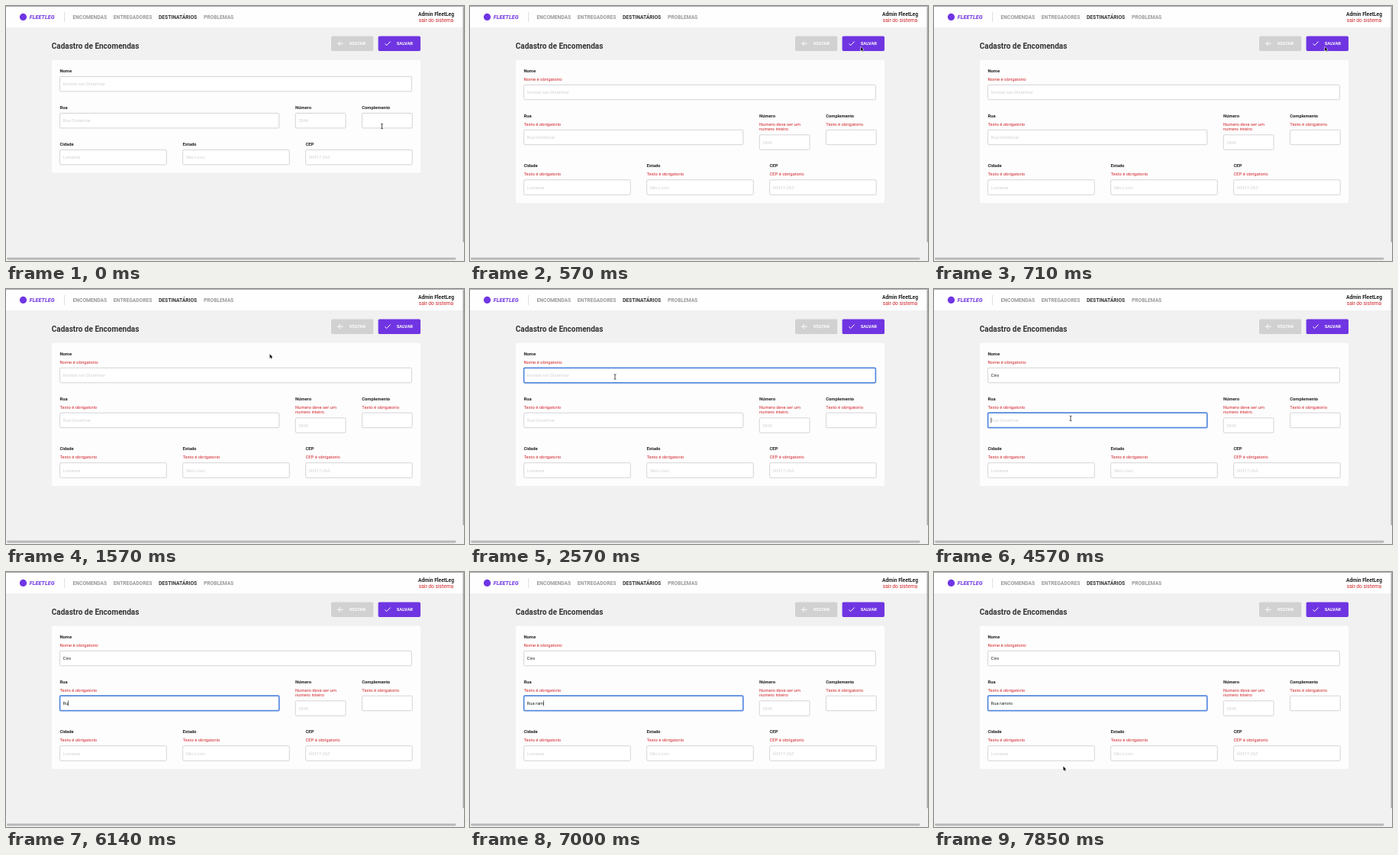
These frames come from a looping animation (600x334 px, 8000 ms). An HTML page with a canvas:

```html
<!DOCTYPE html>
<html lang="pt-BR">
<head>
<meta charset="utf-8">
<title>Cadastro de Encomendas</title>
<style>
html, body { margin: 0; width: 100%; height: 100%; overflow: hidden; background: #f1f1f1; }
canvas { display: block; width: 600px; height: 334px; }
</style>
</head>
<body>
<canvas id="stage"></canvas>
<script>
const W = 600, H = 334, LOOP = 8000, STEP = 1000 / 7;
const PURPLE = '#7035e2', RED = '#d2262b', DARK = '#222';
const ERRORS_AT = 560;

const canvas = document.getElementById('stage');
const ctx = canvas.getContext('2d');
const dpr = window.devicePixelRatio || 1;
canvas.width = W * dpr;
canvas.height = H * dpr;

const REQUIRED = ['Texto é obrigatorio'];
const fields = [
  { row: 0, x: 70.6, w: 460.8, label: 'Nome', hint: 'Konrad van Distelmar', errors: ['Nome é obrigatorio'],
    value: 'Ciro', focus: 2000, blur: 4430, keys: [2860, 3000, 3285, 3425] },
  { row: 1, x: 70.6, w: 287.2, label: 'Rua', hint: 'Rua Distelmar', errors: REQUIRED,
    value: 'Rua ramiro', focus: 4425, blur: LOOP,
    keys: [5710, 6000, 6425, 6565, 6710, 6855, 6995, 7140, 7140, 7285] },
  { row: 1, x: 379.2, w: 65.8, label: 'Número', hint: '2846', errors: ['Numero deve ser um', 'numero inteiro'] },
  { row: 1, x: 466.4, w: 65.8, label: 'Complemento', hint: '', errors: REQUIRED },
  { row: 2, x: 70.6, w: 139.6, label: 'Cidade', hint: 'Lumarea', errors: REQUIRED },
  { row: 2, x: 231.6, w: 139.6, label: 'Estado', hint: 'São Luvio', errors: REQUIRED },
  { row: 2, x: 392.6, w: 139.6, label: 'CEP', hint: '00417-263', errors: ['CEP é obrigatorio'] }
];
const ROWS = { clean: [84.6, 132.6, 180.6], invalid: [84.6, 143.5, 209] };
const FIELD_H = 19.5;

// Pointer path: time, x, y
const path = [
  [0, 492.5, 157.5], [140, 494, 150], [500, 512, 53.5], [1280, 512, 53.5],
  [1850, 190, 115], [3700, 190, 115], [4000, 188.6, 130.2], [4150, 188.6, 130.2],
  [4400, 179, 169.5], [7420, 179, 169.5], [7780, 169.4, 254.6], [LOOP, 169.4, 254.6]
];
const hidden = [[2850, 3850], [5700, 7420]];

function text(str, x, y, size, color, style = '400', align = 'left') {
  ctx.font = `${style} ${size}px Roboto, sans-serif`;
  ctx.textAlign = align;
  ctx.fillStyle = color;
  ctx.fillText(str, x, y + size * 0.355);
}

function box(x, y, w, h, r, fill) {
  ctx.beginPath();
  ctx.roundRect(x, y, w, h, r);
  ctx.fillStyle = fill;
  ctx.fill();
}

function line(points, color, width) {
  ctx.beginPath();
  points.forEach(([x, y], i) => i ? ctx.lineTo(x, y) : ctx.moveTo(x, y));
  ctx.strokeStyle = color;
  ctx.lineWidth = width;
  ctx.stroke();
}

function drawHeader() {
  box(0, 0, W, 28, 0, '#fefefe');
  box(0, 0, W, 0.8, 0, '#8c8c8c');
  ctx.beginPath();
  ctx.arc(22.5, 14.4, 4.6, 0, Math.PI * 2);
  ctx.fillStyle = PURPLE;
  ctx.fill();
  text('FLEETLEG', 30.8, 14.3, 7.3, PURPLE, 'italic 700');
  line([[76.6, 8], [76.6, 21]], '#d5d5d5', 0.8);
  const nav = [['ENCOMENDAS', 87.6], ['ENTREGADORES', 140.8], ['DESTINATÁRIOS', 200], ['PROBLEMAS', 259]];
  nav.forEach(([name, x], i) => text(name, x, 14.2, 6.67, i === 2 ? '#333' : '#999', '700'));
  text('Admin FleetLeg', 587, 10.6, 6.67, DARK, '700', 'right');
  text('sair do sistema', 586.2, 18.4, 6.67, RED, '400', 'right');
}

function drawToolbar() {
  text('Cadastro de Encomendas', 59.8, 52.2, 10, '#333', '700');
  box(426, 39.4, 55.2, 19.6, 1.7, '#d1d1d1');
  line([[441.8, 49.2], [435, 49.2]], '#fff', 1);
  line([[438.3, 45.9], [435, 49.2], [438.3, 52.5]], '#fff', 1);
  text('VOLTAR', 449.7, 49.4, 5.85, '#fff', '700');
  box(487.6, 39.4, 55.4, 19.6, 1.7, PURPLE);
  line([[496.4, 49.4], [498.6, 51.6], [503.6, 46.5]], '#fff', 1);
  text('SALVAR', 511.7, 49.4, 5.85, '#fff', '700');
}

function fieldTop(f, invalid) {
  const label = ROWS[invalid ? 'invalid' : 'clean'][f.row];
  return label + 7.8 + (invalid ? 10.9 + (f.errors.length - 1) * 6.6 : 0);
}

function drawField(f, t, invalid) {
  const labelY = ROWS[invalid ? 'invalid' : 'clean'][f.row];
  const top = fieldTop(f, invalid), mid = top + FIELD_H / 2;
  const keys = f.keys || [];
  const typed = keys.filter(k => k <= t).length;
  const focused = t >= f.focus && t < f.blur;

  text(f.label, f.x - 0.2, labelY, 5.85, DARK, '700');
  if (invalid) f.errors.forEach((e, i) => text(e, f.x - 0.2, labelY + 11.1 + i * 6.6, 5.85, RED));

  box(f.x, top, f.w, FIELD_H, 1.5, '#fff');
  ctx.lineWidth = focused ? 1.7 : 0.8;
  ctx.strokeStyle = focused ? '#5589df' : '#c9c9c9';
  ctx.stroke();

  const value = typed ? f.value.slice(0, typed) : '';
  text(value || f.hint, f.x + 4, mid + 0.2, 5.85, value ? '#222' : '#d2d2d2');

  const since = t - (typed ? keys[typed - 1] : f.focus);
  if (focused && since % 1000 < 500) {
    const x = f.x + 4.2 + (value ? ctx.measureText(value).width : 0);
    line([[x, mid - 3.5], [x, mid + 3.5]], '#222', 0.7);
  }
}

function drawScrollbars() {
  box(598.5, 1, 1.5, 308.5, 0.7, '#a9a9a9');
  box(1, 329.6, 588.5, 2.9, 1.4, '#b8b8b8');
}

function pointerAt(t) {
  const i = path.findIndex(p => p[0] > t);
  const [a, b] = [path[i - 1], path[i]];
  const u = (t - a[0]) / (b[0] - a[0]);
  const k = u * u * (3 - 2 * u);
  return [a[1] + (b[1] - a[1]) * k, a[2] + (b[2] - a[2]) * k];
}

function drawPointer(t, invalid) {
  if (hidden.some(([from, to]) => t >= from && t < to)) return;
  const [x, y] = pointerAt(t);
  const overField = fields.some(f => {
    const top = fieldTop(f, invalid);
    return x > f.x && x < f.x + f.w && y > top && y < top + FIELD_H;
  });
  ctx.save();
  ctx.translate(x, y);
  if (overField) {
    line([[0, -3], [0, 3]], '#222', 0.8);
    line([[-1.5, -3.4], [0, -2.8], [1.5, -3.4]], '#222', 0.7);
    line([[-1.5, 3.4], [0, 2.8], [1.5, 3.4]], '#222', 0.7);
  } else {
    const arrow = [[0, 0], [0, 5.4], [1.25, 4.3], [2.05, 6.1], [2.95, 5.7], [2.15, 3.95], [3.8, 3.9], [0, 0]];
    line(arrow, '#fff', 1);
    ctx.fillStyle = '#111';
    ctx.fill();
  }
  ctx.restore();
}

function draw(t) {
  const invalid = t >= ERRORS_AT;
  ctx.setTransform(dpr, 0, 0, dpr, 0, 0);
  ctx.textBaseline = 'alphabetic';
  ctx.lineJoin = 'round';
  box(0, 0, W, H, 0, '#f1f1f1');
  drawHeader();
  drawToolbar();
  box(60, 70.8, 483, (invalid ? 258 : 218.6) - 70.8, 1.7, '#fdfdfd');
  fields.forEach(f => drawField(f, t, invalid));
  drawScrollbars();
  drawPointer(t, invalid);
}

const start = performance.now();
function tick() {
  const t = (performance.now() - start) % LOOP;
  draw(Math.floor(t / STEP + 0.06) * STEP % LOOP);
  requestAnimationFrame(tick);
}
tick();
</script>
</body>
</html>
```
